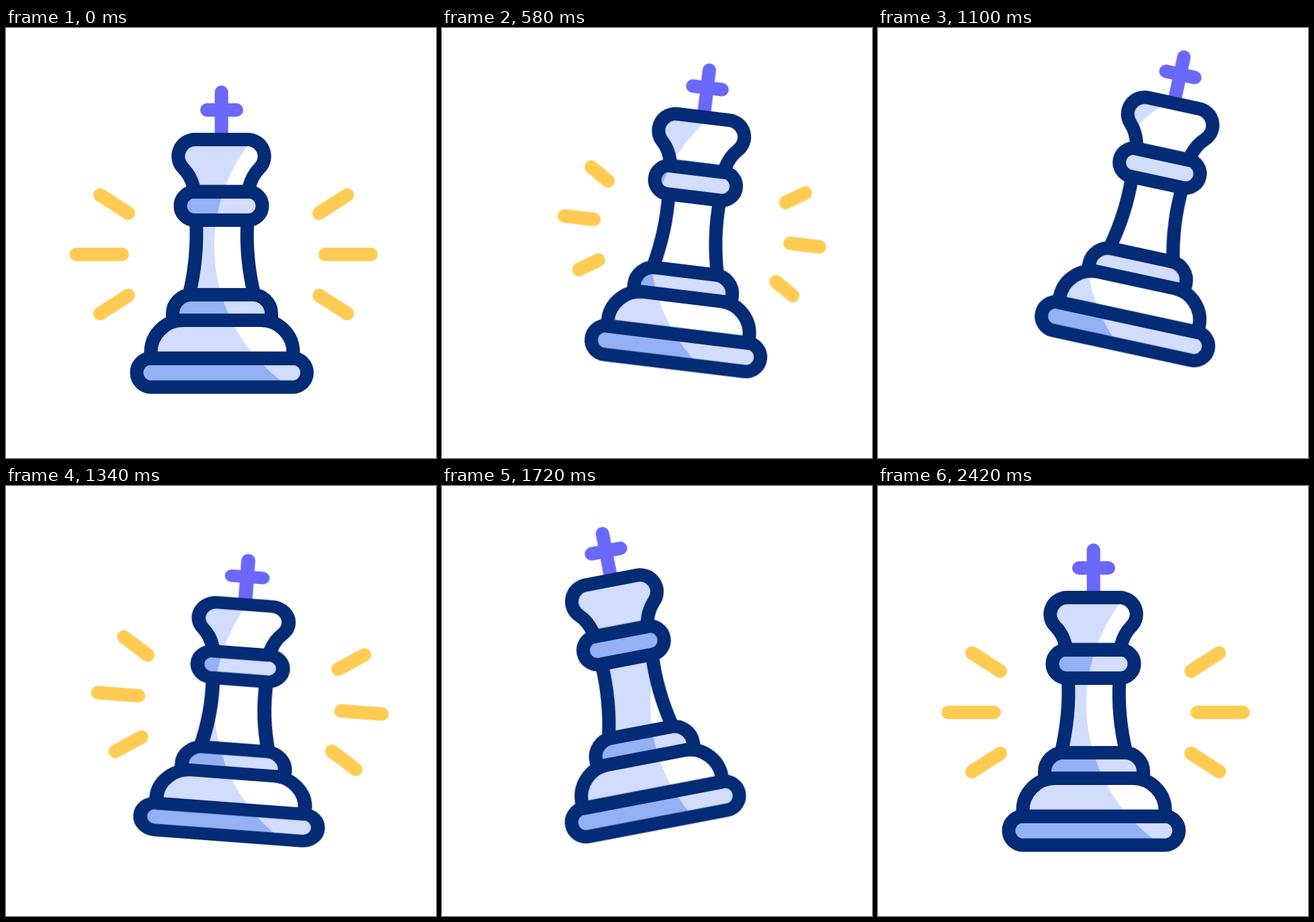
An HTML page without scripts that plays this animation: 640 px wide and 640 px high, repeating every 3000 ms.

```html
<!DOCTYPE html>
<html lang="en">
<head>
<meta charset="utf-8">
<title>Hopping chess king</title>
<style>
  html, body { margin: 0; width: 100%; height: 100%; overflow: hidden; background: #fff; }
  svg { display: block; width: 100%; height: 100%; }

  .hop, .squash, .rays, .trim {
    animation: 3s cubic-bezier(.333, 0, .667, 1) infinite;
  }
  .hop { animation-name: hop; transform-origin: 321px 513px; }
  .squash { animation-name: squash; transform-origin: 321px 533px; }
  .rays { animation-name: pull; transform-origin: 324px 337px; }
  .trim { animation-name: trim; }
  .blink { animation: blink 3s step-end infinite; }

  .shade-soft, .lit-deep { fill: #d2dcfc; }
  .shade-deep { fill: #93b1f4; }
  .lit-soft { fill: #fff; }
  .outline { fill: none; stroke: #032b76; stroke-width: 20; stroke-linejoin: round; }
  .cross { fill: none; stroke: #6a67fb; stroke-width: 20; stroke-linecap: round; }
  .rays { fill: none; stroke: #ffcb52; stroke-width: 20; stroke-linecap: round; }

  /* high hop to the right, small hop to the left, then settle */
  @keyframes hop {
    0%, 7.1% { transform: translate(0, 0) rotate(0deg); }
    31.667% {
      transform: translate(53.8px, -71.8px) rotate(13.88deg);
      animation-timing-function: cubic-bezier(.4, 0, .75, .6);
    }
    44.667% {
      transform: translate(11px, -14.5px) rotate(4.35deg);
      animation-timing-function: linear;
    }
    46.667% {
      transform: translate(2px, -1px) rotate(.6deg);
      animation-timing-function: cubic-bezier(.25, .45, .6, 1);
    }
    58% { transform: translate(-3.6px, -32.2px) rotate(-10.85deg); }
    66.667% { transform: translate(1.6px, -4px) rotate(2.6deg); }
    73.333% { transform: translate(0, 0) rotate(-.6deg); }
    78.667%, 100% { transform: translate(0, 0) rotate(0deg); }
  }
  @keyframes squash {
    0%, 40% { transform: scale(1, 1); }
    45.667% { transform: scale(1.05, .93); }
    52%, 100% { transform: scale(1, 1); }
  }
  /* the stroke grows as the group shrinks, so the weight stays even */
  @keyframes pull {
    0%, 6.667% { transform: scale(1); stroke-width: 20; }
    15.333% { transform: scale(.81); stroke-width: 24.7; }
    26%, 100% { transform: scale(1); stroke-width: 20; }
  }
  @keyframes trim {
    0%, 16% { stroke-dasharray: 100 300; stroke-dashoffset: 0; }
    26%, 26.7% { stroke-dasharray: 1 300; stroke-dashoffset: -99; }
    26.8% { stroke-dasharray: 1 300; stroke-dashoffset: 0; }
    41.167% {
      stroke-dasharray: 1 300; stroke-dashoffset: 0;
      animation-timing-function: cubic-bezier(.215, .61, .355, 1);
    }
    47.833% { stroke-dasharray: 100 300; stroke-dashoffset: 0; }
    56.833%, 57.3% { stroke-dasharray: 1 300; stroke-dashoffset: -99; }
    57.4% { stroke-dasharray: 1 300; stroke-dashoffset: 0; }
    74% {
      stroke-dasharray: 1 300; stroke-dashoffset: 0;
      animation-timing-function: cubic-bezier(.215, .61, .355, 1);
    }
    80.667%, 100% { stroke-dasharray: 100 300; stroke-dashoffset: 0; }
  }
  @keyframes blink {
    0% { opacity: 1; }
    26.6% { opacity: 0; }
    41.167% { opacity: 1; }
    57.2% { opacity: 0; }
    74%, 100% { opacity: 1; }
  }
</style>
</head>
<body>
<svg viewBox="0 0 640 640">
  <defs>
    <g id="soft">
      <path d="M282 166H359A25 25 0 0 1 377 209C370 216 365 225 362 236L360 244H281L279 236C276 225 271 216 264 209A25 25 0 0 1 282 166Z"/>
      <path d="M283 286C285 325 281 362 272.5 397H369.5C361 362 357 325 359.5 286Z"/>
      <path d="M215.5 492V483A48 48 0 0 1 263.5 435H379.5A48 48 0 0 1 427.5 483V492Z"/>
    </g>
    <g id="deep">
      <rect x="259.5" y="243.5" width="122" height="42.5" rx="21.25"/>
      <path d="M248 435V425A28 28 0 0 1 276 397H367A28 28 0 0 1 395 425V435Z"/>
      <rect x="194.5" y="491.5" width="253.5" height="43" rx="21.5"/>
    </g>
    <g id="side">
      <path pathLength="100" d="M182 275.5L140 248.5"/>
      <path pathLength="100" d="M173 337H104.5"/>
      <path pathLength="100" d="M182 398L140 425"/>
    </g>
    <clipPath id="light"><circle cx="561" cy="325" r="251"/></clipPath>
  </defs>

  <g class="hop"><g class="rays"><g class="trim"><g class="blink">
    <use href="#side"/>
    <use href="#side" transform="translate(648) scale(-1 1)"/>
  </g></g></g></g>

  <g class="hop"><g class="squash">
    <use href="#soft" class="shade-soft"/>
    <use href="#deep" class="shade-deep"/>
  </g></g>

  <!-- the light stays in place while the king moves through it -->
  <g clip-path="url(#light)"><g class="hop"><g class="squash">
    <use href="#soft" class="lit-soft"/>
    <use href="#deep" class="lit-deep"/>
  </g></g></g>

  <g class="hop"><g class="squash">
    <path class="cross" d="M320.7 95.5V156M299 122H343"/>
    <g class="outline">
      <use href="#soft"/>
      <use href="#deep"/>
    </g>
  </g></g>
</svg>
</body>
</html>
```
